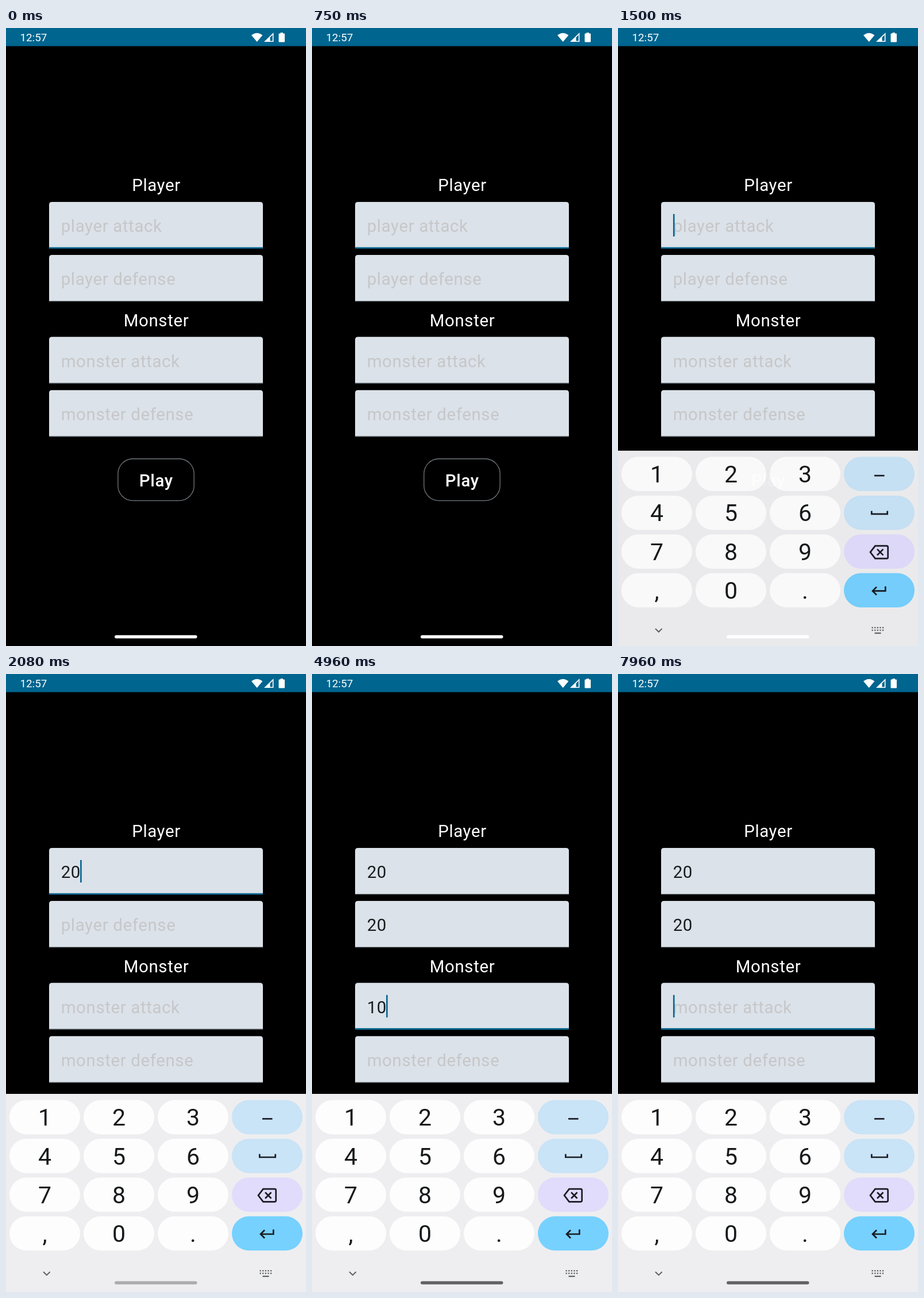
Recreate the animation shown at these times as an HTML page. Size 522x1073 px, loop 8 s.

```html
<!DOCTYPE html>
<html lang="en">
<head>
<meta charset="utf-8">
<style>
  html, body { margin: 0; width: 100%; height: 100%; overflow: hidden; background: #000; }
  svg { display: block; font: 29.4px Roboto, sans-serif; }
  .label { fill: #fff; text-anchor: middle; letter-spacing: .65px; }
  .field { letter-spacing: .65px; }
  .key { font-size: 41px; fill: #17191b; text-anchor: middle; }
  .icon { fill: none; stroke: #191c22; stroke-width: 2.7; }
</style>
</head>
<body>
<svg width="522" height="1073" viewBox="0 0 522 1073">
  <rect width="522" height="1073"/>
  <rect width="522" height="31.5" fill="#00658f"/>
  <g fill="#fff">
    <text x="24.5" y="23" font-size="18.8">12:57</text>
    <path d="M427 12.6Q436.7 5 446.400 12.600L436.700 24Z"/>
    <path d="M449 24L465.500 8V24ZM459.500 22.500H463.800V12L459.500 16.200Z" fill-rule="evenodd"/>
    <path d="M474.500 10.500Q474.500 9.500 475.500 9.500H477.500V8H482V9.500H484Q485 9.500 485 10.500V23.500Q485 24.500 484 24.500H475.500Q474.500 24.500 474.500 23.500Z"/>
  </g>
  <text class="label" x="261.500" y="283">Player</text>
  <text class="label" x="261.500" y="517.500">Monster</text>
  <g id="form"></g>
  <rect id="caret" width="2.600" height="39" fill="#00658f"/>
  <rect x="194.800" y="748" width="132.400" height="72.600" rx="26" fill="none" stroke="#71787e" stroke-width="1.300"/>
  <text class="label" x="261.300" y="795.500" font-weight="500">Play</text>
  <g id="board">
    <rect y="729" width="522" height="344" fill="#eeeef0"/>
    <g id="keys"></g>
    <g class="icon">
      <path d="M446 772.300H463.500"/>
      <path d="M441.300 833.500V839H468.700V833.500"/>
      <path d="M447.500 894.200H467.500Q469.700 894.200 469.700 896.400V914.100Q469.700 916.300 467.500 916.300H447.500L439 905.200ZM451 900L461.500 910.500M461.500 900L451 910.500"/>
      <path d="M465.300 964.500V972.500H443.500M450 965.500L443 972.500L450 979.500"/>
      <path d="M65 1038L70.800 1043.700L76.600 1038" stroke="#5c5f63" stroke-width="2"/>
      <path d="M441.500 1036.200H462.500M441.500 1040.700H462.500" stroke="#5c5f63" stroke-width="2.200" stroke-dasharray="2.300 2.300"/>
      <path d="M446.500 1045.800H457.500" stroke="#5c5f63" stroke-width="2.200"/>
    </g>
  </g>
  <rect id="pill" x="189" y="1054.200" width="143.500" height="5.600" rx="2.800"/>
</svg>
<script>
const LOOP = 8000, FOCUS_SHOWN = 1150, BOARD_IN = 1285, BOARD_MS = 285;
const $ = id => document.getElementById(id);
const clamp = v => Math.max(0, Math.min(1, v));

function add(parent, tag, attrs, text = '') {
  const el = document.createElementNS('http://www.w3.org/2000/svg', tag);
  for (const name in attrs) el.setAttribute(name, attrs[name]);
  el.textContent = text;
  return parent.appendChild(el);
}

const fields = [['player attack', 302], ['player defense', 394],
                ['monster attack', 536.3], ['monster defense', 628.7]].map(([hint, y]) => {
  const form = $('form');
  add(form, 'path', { d: `M75 ${y + 81}v-76q0-5 5-5h362q5 0 5 5v76z`, fill: '#dbe2e9' });
  return {
    hint, y,
    line: add(form, 'rect', { x: 75, width: 372 }),
    label: add(form, 'text', { class: 'field', x: 95.7, y: y + 52.2 })
  };
});

// Key faces in reading order; named keys get an icon instead of text.
const names = ['1', '2', '3', 'minus', '4', '5', '6', 'space',
               '7', '8', '9', 'del', ',', '0', '.', 'enter'];
const tints = { minus: '#c9e3f7', space: '#c9e3f7', del: '#e1dbfc', enter: '#76d1ff' };
const shades = {};
names.forEach((name, i) => {
  const x = 6 + i % 4 * 129, y = 739.7 + Math.floor(i / 4) * 67.3;
  const shape = { x, y, width: 123, height: 59.5, rx: 29.7 };
  add($('keys'), 'rect', { ...shape, fill: tints[name] || '#fdfdfd' });
  shades[name] = add($('keys'), 'rect', { ...shape, 'fill-opacity': .12 });
  if (!tints[name]) add($('keys'), 'text', { class: 'key', x: x + 61.5, y: y + 44.5 }, name);
});

// [time, field, key]; entries without a key move the focus.
const events = [
  [FOCUS_SHOWN, 0], [1750, 0, '2'], [1960, 0, '0'],
  [3000, 1], [3700, 1, '2'], [3930, 1, '0'],
  [4350, 2], [4700, 2, '1'], [4900, 2, '0'],
  [6400, 2, 'del'], [6900, 2, 'del']
];

function draw(t) {
  const values = ['', '', '', ''];
  let active = 0, edited = -1, pressed = '';
  for (const [at, field, key] of events) {
    if (key && t >= at - 80 && t < at + 40) pressed = key;
    if (t < at) continue;
    active = field;
    edited = at;
    if (key) values[field] = key === 'del' ? values[field].slice(0, -1) : values[field] + key;
  }

  fields.forEach(({ hint, y, line, label }, i) => {
    const h = i === active ? 2.6 : 1.3;
    line.setAttribute('y', y + 81.2 - h);
    line.setAttribute('height', h);
    line.setAttribute('fill', i === active ? '#00658f' : '#41484d');
    label.textContent = values[i] || hint;
    label.setAttribute('fill', values[i] ? '#191c1e' : '#c7c7c9');
  });

  const caret = $('caret');
  caret.setAttribute('x', 95.9 + 16.6 * values[active].length);
  caret.setAttribute('y', fields[active].y + 21);
  caret.setAttribute('opacity', edited >= 0 && (t - edited) % 1000 < 500 ? 1 : 0);

  const shown = 1 - (1 - clamp((t - BOARD_IN) / BOARD_MS)) ** 3;
  $('board').setAttribute('transform', `translate(0 ${344 * (1 - shown)})`);
  $('board').setAttribute('opacity', shown);
  for (const name in shades) shades[name].setAttribute('opacity', name === pressed ? 1 : 0);

  const grey = 255 - 157 * clamp((t - 1980) / 190);
  $('pill').setAttribute('fill', `rgb(${grey},${grey},${grey})`);
}

function tick() {
  draw(performance.now() % LOOP);
  requestAnimationFrame(tick);
}
tick();
</script>
</body>
</html>
```
